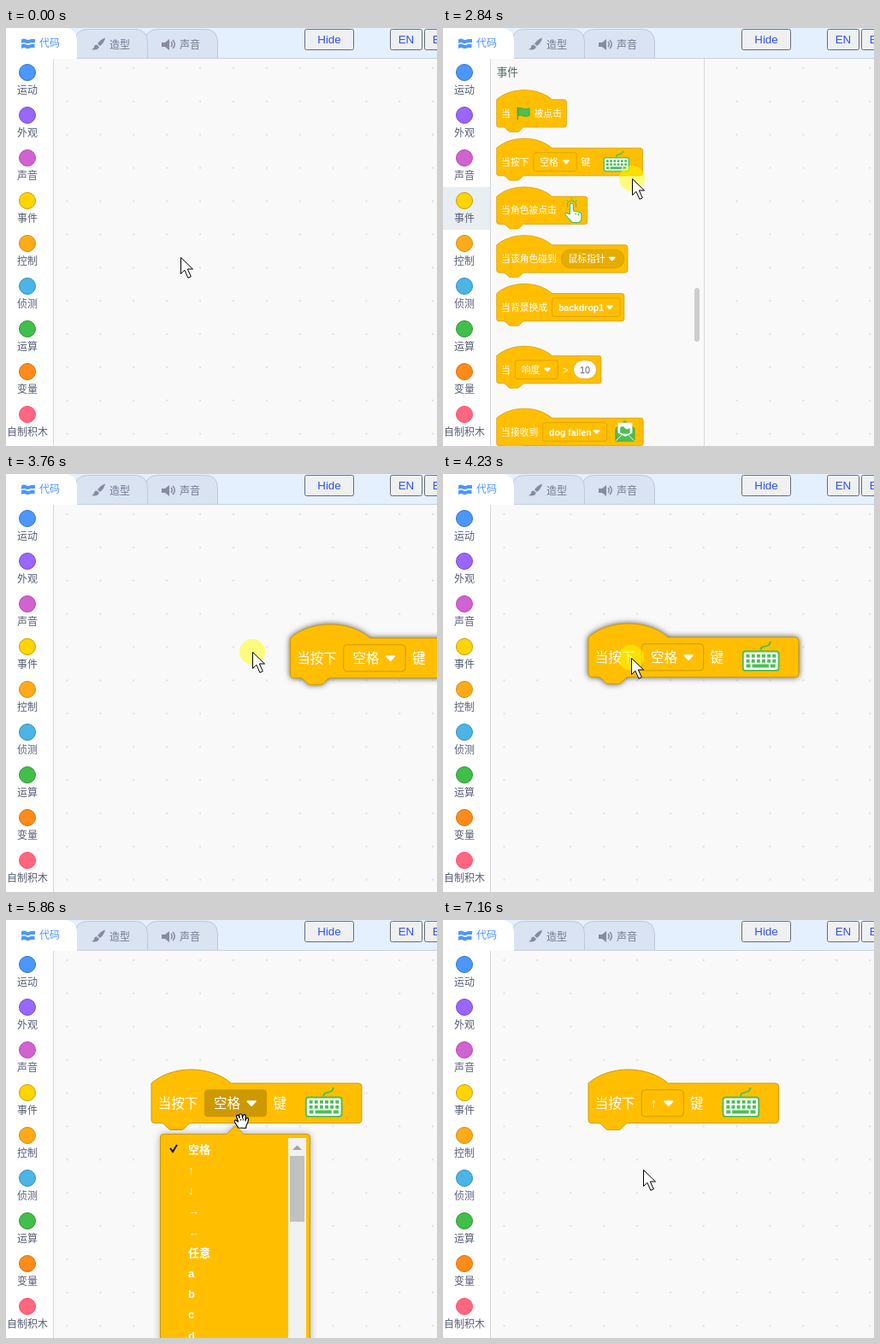
These frames come from a looping animation (504x489 px, 7390 ms). An HTML page:

```html
<!DOCTYPE html>
<html lang="zh-CN">
<head>
<meta charset="utf-8">
<title>积木编辑器</title>
<style>
  html, body { margin: 0; width: 100%; height: 100%; overflow: hidden; background: #f9f9f9; }
  svg { display: block; }
  text { font-family: "Liberation Sans", "Noto Sans CJK SC", "Noto Sans CJK", sans-serif; }
  .ui { font-size: 12px; fill: #575e75; text-anchor: middle; }
  .btn { font-size: 13.33px; fill: #2f50f5; text-anchor: middle; }
  .code { font-size: 16px; font-weight: 500; fill: #fff; }
  .latin { font-weight: 700; font-size: 15.6px; }
  .item { font-size: 13px; font-weight: 700; fill: #fff; }
  .drag { filter: drop-shadow(0 0 4px rgba(0, 0, 0, .65)); }
  #menuBox { filter: drop-shadow(0 0 4px rgba(0, 0, 0, .3)); }
</style>
</head>
<body>
<svg id="stage" width="504" height="489" viewBox="0 0 504 489"></svg>
<script>
const LOOP = 7390, STEP = 77, ROW = 24.2;

// ---------- drawing helpers ----------
const text = (x, y, s, cls = 'code', more = '') => `<text x="${x}" y="${y}" class="${cls}" ${more}>${s}</text>`;
const rect = (x, y, w, h, fill, more = '') => `<rect x="${x}" y="${y}" width="${w}" height="${h}" fill="${fill}" ${more}/>`;
const path = (d, fill = 'none', more = '') => `<path d="${d}" fill="${fill}" ${more}/>`;
const group = (id, body, more = '') => `<g id="${id}" ${more}>${body}</g>`;
const hidden = 'style="display:none"';

const GREEN = '#4cbf56', AMBER = '#ffbf00', AMBER_DARK = '#cc9900';

// Hat block in its own units; the origin is the left end of the body's top edge.
const hat = (w, body) => path(
  `M0 0c25-22 71-22 96 0H${w - 4}a4 4 0 0 1 4 4V44a4 4 0 0 1-4 4H48c-2 0-3 1-4 2l-4 4c-1 1-2 2-4 2H24` +
  'c-2 0-3-1-4-2l-4-4c-1-1-2-2-4-2H4a4 4 0 0 1-4-4z', AMBER, `stroke="${AMBER_DARK}"`) + body;
const word = (x, s) => text(x, 30, s);
const field = (x, w, s, fill = AMBER, round = false) =>
  rect(x, 8, w, 32, fill, `rx="${round ? 16 : 4}" stroke="${AMBER_DARK}"`) +
  text(x + (round ? 12 : 11), 30, s, /\w/.test(s) ? 'code latin' : 'code') +
  path(`M${x + w - (round ? 21 : 18) - 4.8} 21.8h9.6l-4.8 5z`, '#fff', 'stroke="#fff" stroke-width="2" stroke-linejoin="round"');

const keyboard = x => `<g transform="translate(${x})">` +
  path('M22 16C22 8 33 14 34 5', 'none', `stroke="${GREEN}" stroke-width="2"`) +
  rect(1, 17, 43, 23, '#fff', `rx="3" stroke="${GREEN}" stroke-width="2"`) +
  path('M5 22.5H41M5 28.5H41', 'none', `stroke="${GREEN}" stroke-width="4" stroke-dasharray="4 2.3"`) +
  path('M5 34.5h5m2 0h20m2 0h6', 'none', `stroke="${GREEN}" stroke-width="4"`) + '</g>';
const flag = path('M36.5 14V35', 'none', 'stroke="#45993d" stroke-width="2" stroke-linecap="round"') +
  path('M37 15c6-3 9 4 20 0v13c-11 4-14-3-20 0z', GREEN, 'stroke="#45993d"');
const finger = path('M127 31V15q0-3 3-3t3 3v10l10 2q4 1 4 5v6q0 4-4 7h-12l-12-13q-1-4 3-3z', '#fff',
  `stroke="${GREEN}" stroke-width="1.6" stroke-linejoin="round"`) +
  path('M123 19a8 8 0 1 1 14 0M130 2v3m-9 1 2 2m16-2-2 2M137 28v4m5-3v4', 'none', `stroke="${GREEN}" stroke-width="1.5"`);
const envelope = path('M206 18 222 5l17 13v22h-33z', GREEN, 'stroke="#45993d"') +
  path('M210 8h25v18l-12 6-13-6z', '#fff') + path('M214 17q4-5 8 0t9 0v9l-8 3-9-4z', GREEN) +
  path('M206 40l12-12h9l12 12', 'none', 'stroke="#fff" stroke-width="1.3"');

const keyBlock = (s, w, fill) =>
  hat(w + 178.5, word(8, '当按下') + field(64, w, s, fill) + word(w + 72, '键') + keyboard(w + 110.5));

// ---------- page parts ----------
const tab = (x, w, fill) => path(`M${x} 36V17q0-15.5 15-15.5h${w - 30}q15 0 15 15.5v19`, fill, 'stroke="#bccadd"');
const button = (x, w, s, mid) =>
  rect(x + .5, 1.5, w - 1, 24, '#eff0f1', 'rx="2" stroke="#686c72"') + text(mid, 18, s, 'btn');
const GREY = '#868b9d';

const header = rect(0, 0, 504, 36, '#e5f0ff') +
  tab(162.5, 85, '#d9e3f2') + tab(80.5, 85, '#d9e3f2') + path('M0 35.5H504', 'none', 'stroke="#c6cfdb"') +
  path('M0 36V0H69q14 1 14 16v20z', '#fff') +
  path('M18 13.5q3-2 6 0 2 1 5-.5h5v4h-5q-3 2-6 .5-2-1-5 .5zM18 19.5q3-2 6 0 2 1 5-.5h4.500v4h-4.500q-3 2-6 .5-2-1-5 .5z', '#4c97ff') +
  path('M116 11.500q-6 2-9 7l3 2.500q5-4 6-9.500zM106 19.500q-3 0-3 3-1 2-3 2.500 7 2 9-3z', GREY) +
  path('M182 17h4l5-4v13l-5-4h-4z', GREY) +
  path('M193 16q2.500 3 0 6m2-8q4.500 5 0 10', 'none', `stroke="${GREY}" stroke-width="1.5"`) +
  text(51, 22, '代码', 'ui', 'style="fill:#4c97ff"') +
  text(133, 23.5, '造型', 'ui', 'opacity=".8"') + text(215, 23.5, '声音', 'ui', 'opacity=".8"') +
  button(349, 58, 'Hide', 378) + button(449, 38, 'EN', 468) + button(489, 40, 'EN', 508);

const categories = [
  ['运动', '#4c97ff', '#3373cc'], ['外观', '#9966ff', '#774dcb'], ['声音', '#cf63cf', '#bd42bd'],
  ['事件', '#ffd500', '#cc9900'], ['控制', '#ffab19', '#cf8b17'], ['侦测', '#4cb5e6', '#2e8eb8'],
  ['运算', '#40bf4a', '#389438'], ['变量', '#ff8c1a', '#db6e00'], ['自制积木', '#ff6680', '#ff4d6a']];
const sidebar = rect(0, 36, 55, 453, '#fff') + rect(0, 186, 55, 50, '#e9eef2', `id="selected" ${hidden}`) +
  path('M55.5 36V489', 'none', 'stroke="#d3d6da"') +
  categories.map(([name, fill, edge], i) =>
    `<circle cx="25" cy="${52 + 50 * i}" r="9.5" fill="${fill}" stroke="${edge}"/>` +
    text(25, 77 + 50 * i, name, 'ui', `id="cat${i}"`)).join('');

const palette = [
  [0, 121, word(8, '当') + flag + word(65, '被点击')],
  [84, 0, keyBlock('空格', 74.5, AMBER)],
  [168, 157, word(8, '当角色被点击') + finger],
  [252, 227, word(8, '当该角色碰到') + field(112, 109, '鼠标指针', '#e6ac00', true)],
  [336, 221, word(8, '当背景换成') + field(96, 118, 'backdrop1')],
  [444, 181, word(8, '当') + field(32, 74, '响度') + word(115, '&gt;') +
    rect(133, 8, 40, 32, '#fff', `rx="16" stroke="${AMBER_DARK}"`) +
    text(153, 30, '10', 'code', 'style="fill:#575e75;text-anchor:middle"')],
  [552, 254, word(8, '当接收到') + field(80, 111, 'dog fallen') + envelope]];
const flyout = rect(56, 36, 250, 453, '#f9f9f9') + path('M305.5 36V489', 'none', 'stroke="#d9d9d9"') +
  rect(294, 304, 6, 63, '#cecdce', 'rx="3"') +
  text(62.7, 56, '事件', 'code', 'style="font-size:12.6px;fill:#4d6660"') +
  '<g transform="translate(62.7 83.7) scale(.675)">' +
  palette.map(([y, w, body]) => `<g transform="translate(0 ${y})">${w ? hat(w, body) : body}</g>`).join('') + '</g>';

const items = ['空格', '↑', '↓', '→', '←', '任意', 'a', 'b', 'c', 'd'];
const menu = path('M184 250.500H258l10-10 10 10h74q3.500 0 3.500 4V495H180.500V254q0-3.500 3.500-3.500z', AMBER,
    `id="menuBox" stroke="${AMBER_DARK}"`) +
  rect(185, 0, 145, ROW, 'rgba(0,0,0,.2)', `id="hover" ${hidden}`) +
  path('M192 267l3 4 5-8', 'none', 'stroke="#111" stroke-width="2"') +
  items.map((s, i) => text(213, 272.7 + ROW * i, s, 'item')).join('') +
  rect(330, 255, 21, 234, '#f1f1f1') + rect(332, 276, 17, 77, '#c1c1c1') + path('M335 269l5.500-5.500 5.500 5.500z', '#a3a3a3');

const cursor = '<circle id="press" r="15" fill="#ff0" fill-opacity=".5"/>' +
  path('M.5.5V19.500l4.400-4.200 4 9 3.400-1.500-4-8.800h6.200z', '#fff', 'id="arrow" stroke="#000"') +
  path('M-3.500 8-7.500 1.500q-1-2 1-2.500l3 2-2-6q0-2.500 2.500-1.500l1 3-.3-3.500q1.500-2.500 3.300 0l.6 3.500.6-3q2-2 3 .5V-1' +
    'l1-2.500q2.500-.5 2.300 2-.5 4-2.500 7l-.5 3z', '#fff', 'id="hand" stroke="#000" stroke-width="1.200" stroke-linejoin="round"') +
  path('M-.5-2V-.5M2.200-3v2.500M5-2v2.500', 'none', 'id="knuckles" stroke="#000"');

document.getElementById('stage').innerHTML =
  '<defs><pattern id="grid" x="70.5" y="46" width="38.88" height="38.88" patternUnits="userSpaceOnUse">' +
  rect(0, 0, 2, 2, '#e1e1e1') + '</pattern></defs>' +
  rect(0, 0, 504, 489, '#f9f9f9') + rect(56, 36, 448, 453, 'url(#grid)') +
  group('block', group('idle', keyBlock('空格', 74.5, AMBER)) + group('opened', keyBlock('空格', 74.5, AMBER_DARK)) +
    group('changed', keyBlock('↑', 50.5, AMBER))) +
  group('flyout', flyout, hidden) + header + sidebar + group('menu', menu, hidden) + group('cursor', cursor);

// ---------- motion ----------
// Rows are [time, x, y]; values advance in steps, as in a screen recording.
const cursorKeys = [
  [0, 204, 268], [590, 30, 200], [670, 28, 211], [1204, 28, 211], [1440, 81, 181], [1590, 97, 159],
  [1740, 97, 159], [1760, 98, 157], [2120, 98, 157], [2140, 99, 158], [2444, 99, 158], [2840, 221, 176],
  [3230, 371, 208], [3400, 371, 210], [3760, 288, 208], [4000, 220, 215], [4393, 220, 215],
  [4700, 232, 256], [5080, 288, 216], [5800, 288, 216], [5860, 275, 235], [6090, 234, 292], [LOOP, 234, 292]];
const blockKeys = [
  [0, 89, 146], [3230, 89, 146], [3690, 332.5, 192], [3770, 332.5, 192], [4000, 187, 191.5],
  [4220, 170, 191], [LOOP, 170, 191]];

function at(keys, t) {
  const i = Math.max(1, keys.findIndex(k => k[0] > t));
  const [t0, x0, y0] = keys[i - 1], [t1, x1, y1] = keys[i];
  const u = Math.floor((t - t0) / STEP + .02) * STEP / (t1 - t0);
  return [x0 + (x1 - x0) * u, y0 + (y1 - y0) * u];
}

const $ = id => document.getElementById(id);
const show = (id, on) => { $(id).style.display = on ? '' : 'none'; };
const within = (t, ...spans) => spans.some(([a, b]) => t >= a && t < b);
const ramp = (t, a, b) => Math.min(1, Math.max(0, (t - a) / (b - a)));

function draw(t) {
  const [cx, cy] = at(cursorKeys, t), [bx, by] = at(blockKeys, t);
  $('cursor').setAttribute('transform', `translate(${Math.round(cx)} ${Math.round(cy)})`);
  $('block').setAttribute('transform', `translate(${bx} ${by}) scale(.972)`);

  const grab = within(t, [1590, 2520], [5860, 5935]);
  show('arrow', !grab);
  show('hand', grab);
  show('knuckles', grab);
  show('press', within(t, [2520, 4470], [5180, 5260], [6250, 6330], [7080, 7160]));

  const palOpen = within(t, [900, 3160]);
  show('flyout', palOpen);
  show('selected', palOpen);
  $('cat3').style.fill = within(t, [590, 1510]) ? '#4c97ff' : '';

  show('block', t >= 3160);
  $('block').setAttribute('class', t < 4470 ? 'drag' : '');
  show('idle', t < 5230);
  show('opened', within(t, [5230, 6330]));
  show('changed', t >= 6330);

  show('menu', within(t, [5230, 6600]));
  $('menu').style.opacity = ramp(t, 5160, 5480) * (1 - ramp(t, 6250, 6600));
  const row = Math.floor((cy - 256) / ROW);
  show('hover', row >= 0);
  $('hover').setAttribute('y', 256 + ROW * row);
}

const start = performance.now();
(function frame() {
  draw((performance.now() - start) % LOOP);
  requestAnimationFrame(frame);
})();
</script>
</body>
</html>
```
